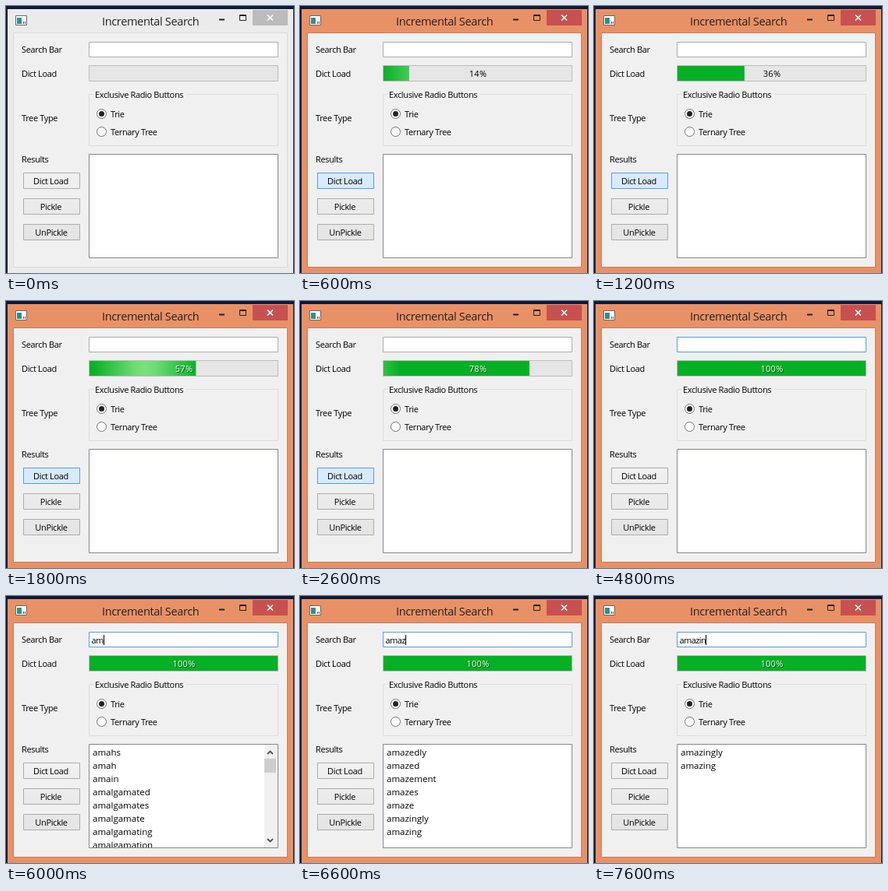
Write an HTML page that moves like this. It is 369 by 343 pixels and loops after 8 s.

```html
<!DOCTYPE html>
<html lang="en">
<head>
<meta charset="utf-8">
<title>Incremental Search</title>
<style>
  html, body { margin: 0; width: 100%; height: 100%; overflow: hidden; background: #0b1a38; }
  svg { display: block; width: 100%; height: 100%; font: 11px "Open Sans", "Noto Sans", sans-serif; letter-spacing: -.35px; }
  svg { --frame: #ebebeb; --edge: #d9d9d9; --close: #bcbcbc; }
  svg.active { --frame: #e99166; --edge: #c47a56; --close: #c75050; }
  .frame { fill: var(--frame); }
  .client { fill: #f0f0f0; stroke: var(--edge); }
  .close { fill: var(--close); }
  .title { font-size: 14.5px; letter-spacing: -.33px; fill: #222; }
  .mid { text-anchor: middle; }
  .field { fill: #fff; stroke: #abadb3; }
  .field.focus { stroke: #569de5; }
  .percent { letter-spacing: .3px; }
  .percent.over { fill: #fff; text-shadow: 1px 1px 0 #0a4a14; }
  .typed { letter-spacing: -.6px; }
  .list { font-size: 11.5px; letter-spacing: 0; }
  .line { fill: none; stroke: #222; }
</style>
</head>
<body>
<svg id="stage" viewBox="0 0 369 343" preserveAspectRatio="none">
  <defs>
    <linearGradient id="face" x2="0" y2="1">
      <stop stop-color="#f1f1f1"/><stop offset="1" stop-color="#e4e4e4"/>
    </linearGradient>
    <linearGradient id="glow" gradientUnits="userSpaceOnUse" x1="-68" x2="68">
      <stop stop-color="#7fe381" stop-opacity="0"/>
      <stop offset=".4" stop-color="#7fe381" stop-opacity=".85"/>
      <stop offset=".5" stop-color="#7fe381" stop-opacity=".95"/>
      <stop offset=".6" stop-color="#7fe381" stop-opacity=".85"/>
      <stop offset="1" stop-color="#7fe381" stop-opacity="0"/>
    </linearGradient>
    <clipPath id="listClip"><path d="M107 191h241v132H107z"/></clipPath>
  </defs>

  <path fill="#0b1a38" d="M0 0h369v343H0z"/>
  <path class="frame" d="M2 4h366v339H2z"/>
  <path class="client" d="M9.5 34.5h351v301h-351z"/>

  <!-- title bar -->
  <path fill="#fff" stroke="#666" d="M12.5 12.5h14v12h-14z"/>
  <path fill="#2f8f8a" d="M14 15h6v8h-6z"/>
  <path fill="#555" d="M22 20h1v3h-1zM24 20h1v3h-1z"/>
  <text class="title" x="123" y="25">Incremental Search</text>
  <path fill="#222" d="M273 16.5h7v2h-7z"/>
  <path class="line" d="M299.5 11.5h8v7h-8zM299 12.5h9"/>
  <path class="close" d="M316 5h45v20h-45z"/>
  <path stroke="#fff" stroke-width="1.7" d="M335 11.5l7 7m0-7l-7 7"/>

  <!-- form labels -->
  <text x="20" y="60">Search Bar</text>
  <text x="20" y="91">Dict Load</text>
  <text x="20" y="148">Tree Type</text>
  <text x="20" y="201">Results</text>

  <!-- search field -->
  <path id="search" class="field" d="M106.5 46.5h242v19h-242z"/>
  <text id="typed" class="typed" x="109.5" y="61"></text>
  <path id="caret" d="M0 50h1v13H0z"/>

  <!-- progress bar -->
  <path fill="#e6e6e6" stroke="#bcbcbc" d="M106.5 76.5h242v20h-242z"/>
  <rect id="fill" x="107" y="77" height="19" fill="#06b025"/>
  <rect id="shine" x="107" y="77" height="19" fill="url(#glow)"/>
  <text id="percent" class="percent mid" x="228" y="91"></text>

  <!-- radio group -->
  <path fill="none" stroke="#dcdcdc" d="M106.5 113.5h242v66h-242z"/>
  <path fill="#f0f0f0" d="M112 108h119v12H112z"/>
  <text x="114" y="118">Exclusive Radio Buttons</text>
  <g fill="#fff" stroke="#707070"><circle cx="122.5" cy="138.5" r="6"/><circle cx="122.5" cy="161.5" r="6"/></g>
  <circle cx="122.5" cy="138.5" r="3.5" fill="#222"/>
  <text x="134" y="143">Trie</text>
  <text x="134" y="166">Ternary Tree</text>

  <!-- buttons -->
  <g fill="url(#face)" stroke="#acacac">
    <path d="M22.5 214.5h72v20h-72zM22.5 247.5h72v20h-72zM22.5 280.5h72v20h-72z"/>
  </g>
  <path id="hot" d="M22.5 214.5h72v20h-72z"/>
  <g class="mid">
    <text x="57.5" y="229">Dict Load</text>
    <text x="57.5" y="262">Pickle</text>
    <text x="58" y="295">UnPickle</text>
  </g>

  <!-- results -->
  <path fill="#fff" stroke="#828790" d="M106.5 190.5h242v133h-242z"/>
  <g id="list" class="list" clip-path="url(#listClip)"></g>
  <g id="scroll">
    <path fill="#f0f0f0" d="M331 191h17v132h-17z"/>
    <path fill="#cdcdcd" d="M331 209h15v18h-15z"/>
    <path fill="none" stroke="#505050" stroke-width="1.8" d="M335 203l3.5-3.5 3.5 3.5M335 312l3.5 3.5 3.5-3.5"/>
  </g>
</svg>

<script>
const $ = id => document.getElementById(id);
const LOOP = 8000, STEP = 200;

// [start time, typed text, words found]
const amWords = "amahs amah amain amalgamated amalgamates amalgamate amalgamating amalgamation";
const typing = [
  [0, "", ""],
  [5400, "a", "aahed aahing aahs aah aaliis aalii aardvarks aardvark"],
  [6000, "am", amWords],
  [6200, "ama", amWords],
  [6600, "amaz", "amazedly amazed amazement amazes amaze amazingly amazing"],
  [6800, "amazi", "amazingly amazing"],
  [7000, "amazin", "amazingly amazing"]
];
const caretToggles = [3400, 3800, 4200, 4800, 5400, 7400, 7600];

function progress(t) {
  const points = [[200, 0], [600, 14], [1800, 57], [2600, 78], [3000, 100]];
  if (t <= 200) return 0;
  for (let i = 1; i < points.length; i++) {
    const [t0, v0] = points[i - 1], [t1, v1] = points[i];
    if (t <= t1) return Math.round(v0 + (v1 - v0) * (t - t0) / (t1 - t0));
  }
  return 100;
}

function drawProgress(t) {
  const value = progress(t);
  const width = value === 100 ? 241 : Math.max(0, value * 2.41 - 1);
  $("fill").setAttribute("width", width);
  $("shine").setAttribute("width", value < 100 ? width : 0);
  const lap = 362, start = 47;
  const offset = 131 + 0.305 * (t - 1800);
  const center = start + ((offset % lap) + lap) % lap;
  $("glow").setAttribute("gradientTransform", `translate(${center})`);
  $("percent").textContent = value ? value + "%" : "";
  $("percent").classList.toggle("over", value > 50);
}

function drawButton(t) {
  const focused = t < 3400;
  const fade = Math.min(1, Math.max(0, (t - 4000) / 800));
  $("hot").setAttribute("fill", focused ? "#d8eafc" : "#e3f0fc");
  $("hot").setAttribute("stroke", focused ? "#569de5" : "#7eb4ea");
  $("hot").setAttribute("opacity", t < 200 ? 0 : 1 - fade);
}

function drawSearch(t) {
  const [, text, words] = typing.filter(s => s[0] <= t).pop();
  $("search").classList.toggle("focus", t >= 3400);
  $("typed").textContent = text;
  const x = text ? Math.round(109.5 + $("typed").getComputedTextLength()) : 110;
  $("caret").setAttribute("transform", `translate(${x})`);
  $("caret").setAttribute("opacity", caretToggles.filter(c => c <= t).length % 2);

  const rows = words ? words.split(" ") : [];
  $("list").innerHTML = rows.map((word, i) => `<text x="111" y="${205 + i * 17}">${word}</text>`).join("");
  $("scroll").setAttribute("opacity", rows.length > 7 ? 1 : 0);
}

let shown = -1;
const begin = performance.now();
function tick() {
  const t = Math.floor((performance.now() - begin) % LOOP / STEP) * STEP;
  if (t !== shown) {
    shown = t;
    $("stage").classList.toggle("active", t >= 200);
    drawProgress(t);
    drawButton(t);
    drawSearch(t);
  }
  requestAnimationFrame(tick);
}
tick();
</script>
</body>
</html>
```
